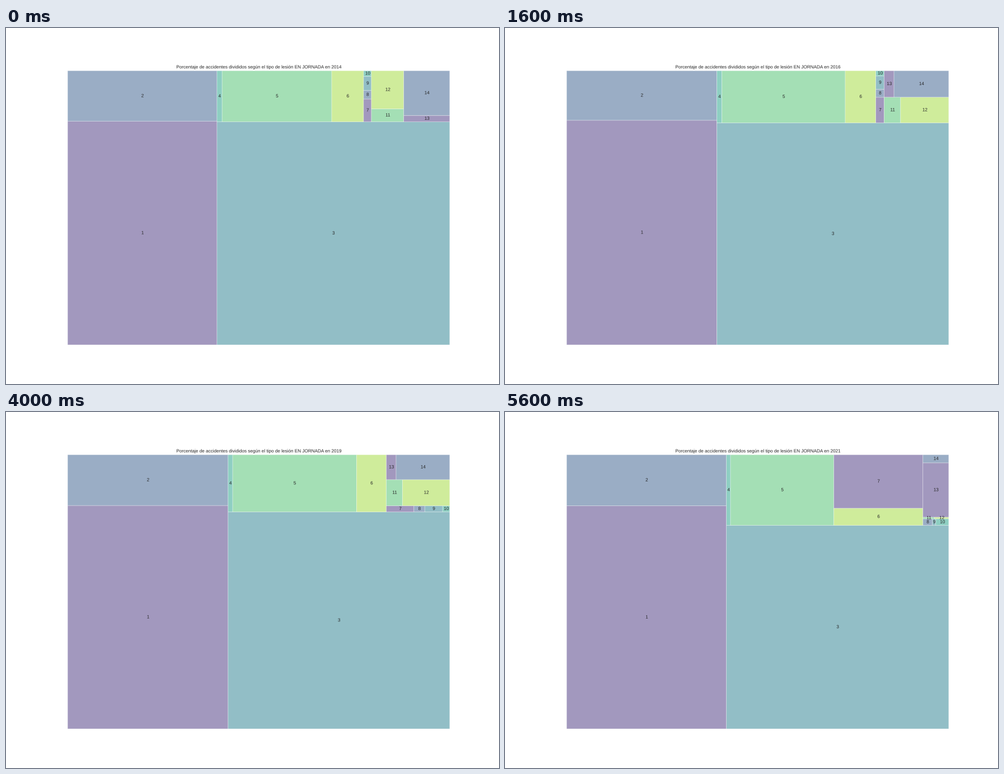
Write a matplotlib script that moves like this. It is 881 by 636 pixels and loops after 6400 ms.

```python
import numpy as np
import matplotlib.pyplot as plt
from matplotlib.animation import FuncAnimation
from matplotlib.patches import PathPatch, Rectangle
from matplotlib.textpath import TextPath
from matplotlib.transforms import Affine2D

WIDTH, HEIGHT, DPI = 881, 636, 100
POINT = WIDTH / 18 / 72    # one point in pixels on an 18 inch wide page
EM = 12 * POINT
SIDE = 100                 # the treemap is laid out in a square of this side
LEFT, BOTTOM, BOX_W, BOX_H = 0.125, 0.11, 0.775, 0.77
INK = "#262626"
PALETTE = ["#46327e", "#365c8d", "#277f8e", "#1fa187", "#4ac16d", "#a0da39"]

YEARS = range(2014, 2022)
TYPES = range(1, 15)

# Percentages of the injury types that drift, at a few key years.
KEY_YEARS = [2014, 2016, 2017, 2019, 2020, 2021]
TRENDS = {
    1: [31.88, 32.22, 33.10, 34.22, 33.66, 34.04],
    2: [7.21, 7.11, 7.18, 7.78, 8.11, 7.79],
    3: [49.55, 49.13, 47.99, 45.89, 44.81, 43.18],
    5: [5.35, 6.14, 6.36, 6.77, 6.81, 6.97],
    6: [1.556, 1.522, 1.608, 1.629, 1.400, 1.456],
    7: [0.170, 0.203, 0.172, 0.162, 3.21, 4.55],
    13: [0.281, 0.249, 0.220, 0.231, 1.256, 1.338],
}
# The small types stay level, apart from a break in 2020.
EARLY = {4: 0.25, 8: 0.064, 9: 0.105, 10: 0.042, 11: 0.402, 12: 1.178}
LATE = {4: 0.275, 8: 0.059, 9: 0.0214, 10: 0.0806, 11: 0.0178, 12: 0.0221}


def percentages(year):
    share = dict(EARLY if year < 2020 else LATE)
    for kind, values in TRENDS.items():
        share[kind] = np.interp(year, KEY_YEARS, values)
    share[14] = 100 - sum(share.values())
    return [share[kind] for kind in TYPES]


def strip(areas, x, y, w, h):
    """Stack areas along the shorter side; return the boxes and the free box."""
    wide = w >= h
    depth = sum(areas) / (h if wide else w)
    boxes, pos = [], 0
    for area in areas:
        size = area / depth
        boxes.append((x, y + pos, depth, size) if wide
                     else (x + pos, y, size, depth))
        pos += size
    free = (x + depth, y, w - depth, h) if wide else (x, y + depth, w, h - depth)
    return boxes, free


def worst_ratio(areas, space):
    boxes, _ = strip(areas, *space)
    return max(max(w / h, h / w) for _, _, w, h in boxes)


def squarify(areas, space):
    """Squarified treemap that keeps the given order."""
    boxes = []
    while areas:
        n = 1
        while (n < len(areas) and worst_ratio(areas[:n], space)
               >= worst_ratio(areas[:n + 1], space)):
            n += 1
        row, space = strip(areas[:n], *space)
        boxes += row
        areas = areas[n:]
    return boxes


fig = plt.figure(figsize=(WIDTH / DPI, HEIGHT / DPI), dpi=DPI, facecolor="white")
ax = fig.add_axes([LEFT, BOTTOM, BOX_W, BOX_H])
page = fig.add_axes([0, 0, 1, 1])   # pixel coordinates, for the lettering


def write(text, x, y):
    """Letter text as outlines, centred on x with its baseline at y (pixels)."""
    path = TextPath((0, 0), text, size=EM, prop={"family": "Liberation Sans"})
    place = Affine2D().translate(x - path.get_extents().width / 2, y)
    page.add_patch(PathPatch(path.transformed(place), color=INK, linewidth=0))


def draw(i):
    year = YEARS[i]
    for axes, w, h in ((ax, SIDE, SIDE), (page, WIDTH, HEIGHT)):
        axes.clear()
        axes.set(xlim=(0, w), ylim=(0, h))
        axes.axis("off")
    write("Porcentaje de accidentes divididos según el tipo de lesión "
          f"EN JORNADA en {year}",
          (LEFT + BOX_W / 2) * WIDTH, (BOTTOM + BOX_H) * HEIGHT + EM / 2)

    areas = [p * SIDE * SIDE / 100 for p in percentages(year)]
    for kind, (x, y, w, h) in zip(TYPES, squarify(areas, (0, 0, SIDE, SIDE))):
        ax.add_patch(Rectangle((x, y), w, h, alpha=0.5, snap=False,
                               facecolor=PALETTE[(kind - 1) % len(PALETTE)],
                               edgecolor="white", linewidth=POINT * 72 / DPI))
        write(str(kind),
              (LEFT + BOX_W * (x + w / 2) / SIDE) * WIDTH,
              (BOTTOM + BOX_H * (y + h / 2) / SIDE) * HEIGHT - EM / 4)


anim = FuncAnimation(fig, draw, frames=len(YEARS), interval=800,
                     repeat=True, repeat_delay=0)
plt.show()
```
